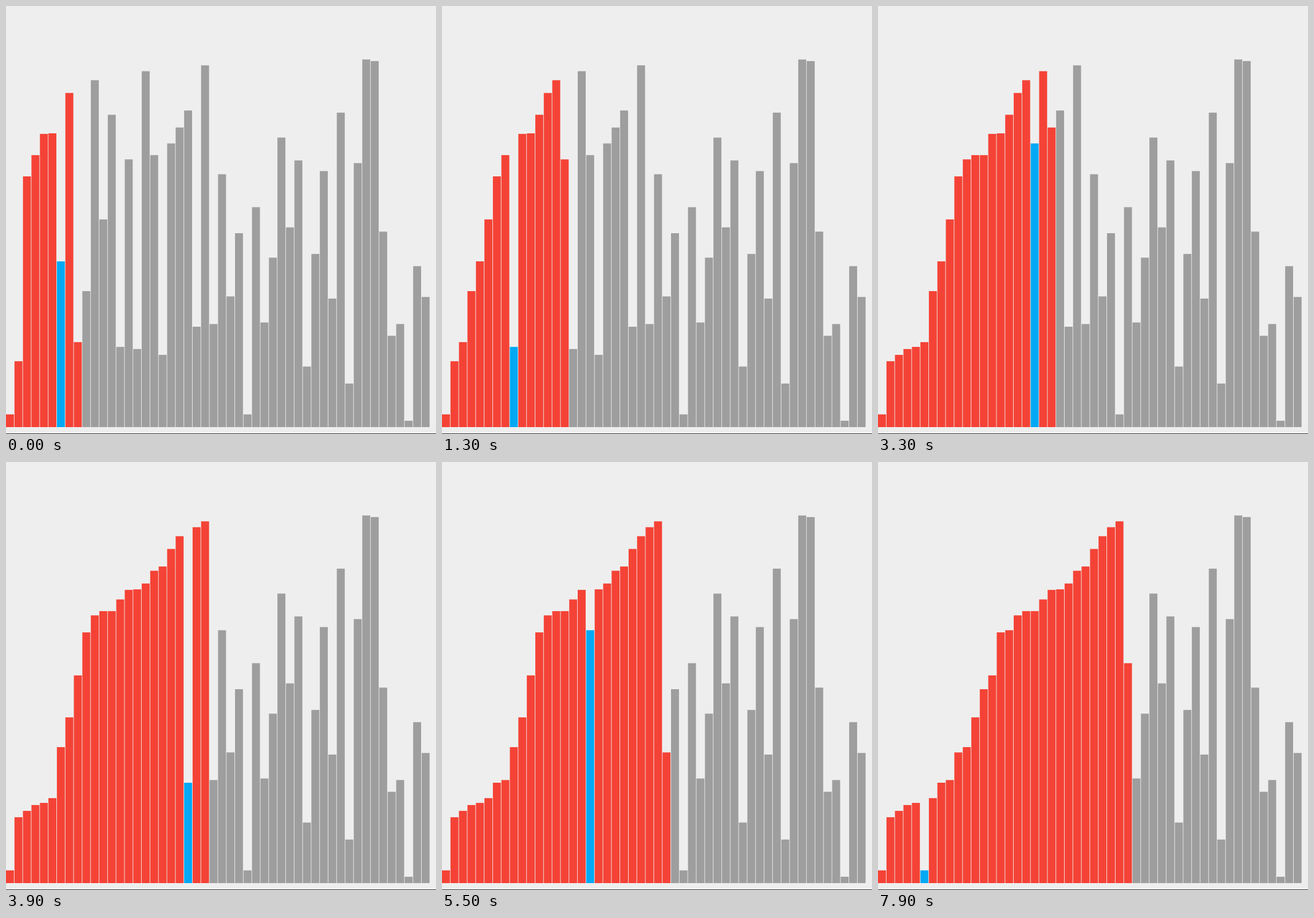
Recreate the animation shown at these times as an HTML page with a canvas. Size 751 by 746 pixels, loop 8 s.

```html
<!DOCTYPE html>
<html lang="en">
<head>
<meta charset="utf-8">
<title>Insertion sort</title>
<style>
html, body { margin: 0; width: 100%; height: 100%; overflow: hidden; background: #eee; }
canvas { display: block; }
</style>
</head>
<body>
<canvas id="stage" width="751" height="746"></canvas>
<script>
const ctx = document.getElementById('stage').getContext('2d');
const LOOP = 8000, TICK = 100, STEPS_PER_TICK = 2.7;
const SCALE = 25 / 27, BASE = 734, PITCH = 16, BAR = 15;
const RED = '#f44336', BLUE = '#03a9f4', GREY = '#9e9e9e';

// The values to sort; all motion follows from them.
const VALUES = [
  24, 124, 472, 512, 552, 553, 312, 629, 160, 256, 653, 391, 588, 151, 504, 147, 670,
  512, 136, 534, 564, 596, 189, 681, 194, 476, 246, 365, 24, 414, 197, 319, 545, 376,
  502, 114, 326, 482, 242, 592, 82, 497, 692, 689, 368, 172, 194, 12, 303, 245
];

// Insertion sort, joined while item 7 is already one place down.
function sortAfter(steps) {
  const bars = [...VALUES];
  let item = 7, pos = 6;
  while (steps-- > 0) {
    if (pos > 0 && bars[pos - 1] > bars[pos]) {
      [bars[pos - 1], bars[pos]] = [bars[pos], bars[pos - 1]];
      pos--;
    } else {
      pos = ++item;
    }
  }
  // the red range grows once an item starts to move
  return { bars, pos, last: pos < item ? item + 1 : item };
}

function draw(time) {
  const tick = Math.floor(time % LOOP / TICK);
  const { bars, pos, last } = sortAfter(Math.floor(tick * STEPS_PER_TICK + 0.2));
  ctx.resetTransform();
  ctx.fillStyle = '#eee';
  ctx.fillRect(0, 0, 751, 746);
  ctx.fillStyle = '#333';
  ctx.fillRect(0, 745, 751, 1);
  ctx.setTransform(SCALE, 0, 0, SCALE, 0, BASE);
  bars.forEach((height, k) => {
    ctx.fillStyle = k === pos ? BLUE : k <= last ? RED : GREY;
    ctx.fillRect(k * PITCH, -height, BAR, height);
  });
}

const begin = performance.now();
function frame() {
  draw(performance.now() - begin);
  requestAnimationFrame(frame);
}
frame();
</script>
</body>
</html>
```
